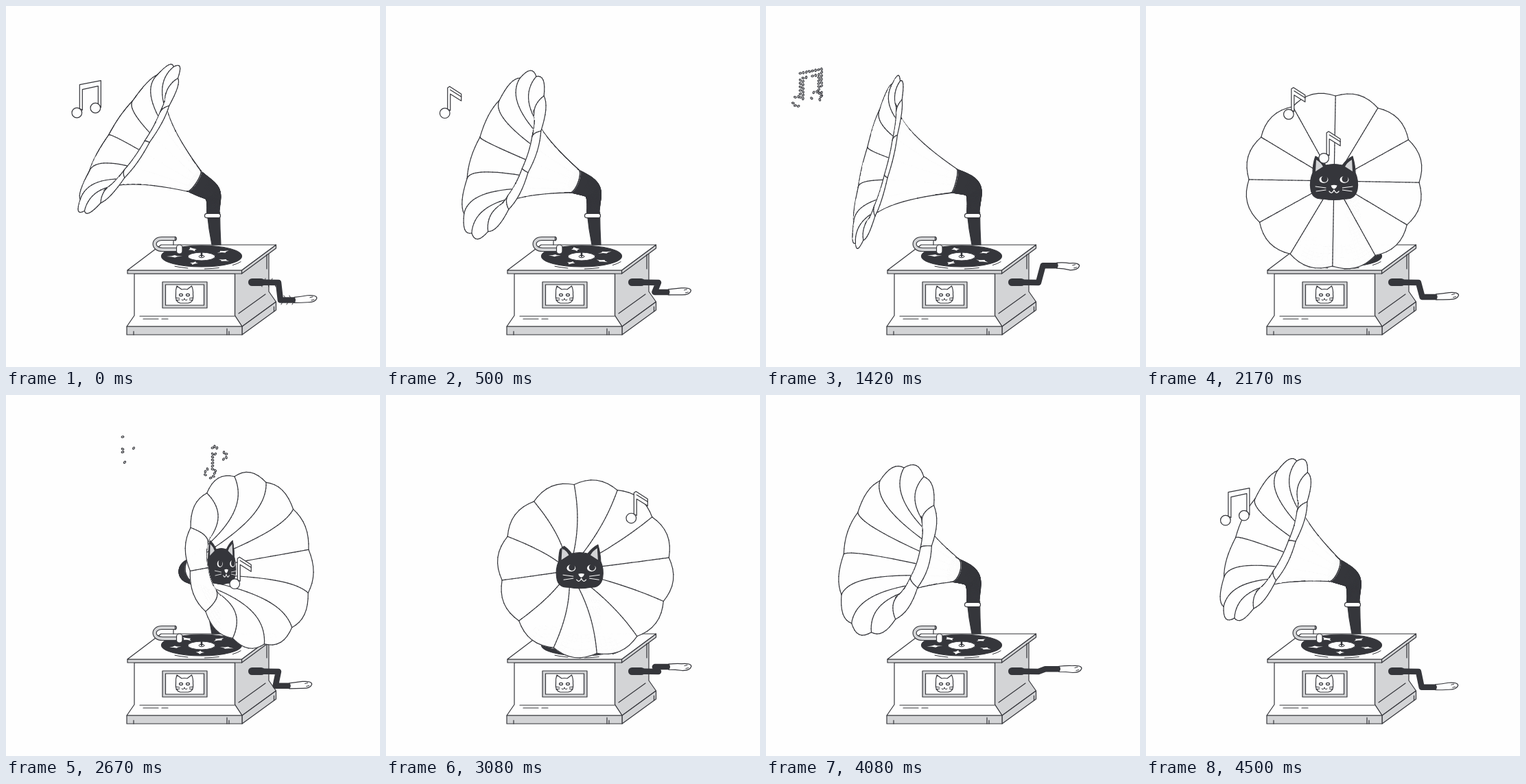
Recreate the animation shown at these times as an HTML page with a canvas. Size 545 by 526 pixels, loop 4580 ms.

```html
<!DOCTYPE html>
<html>
<head>
<meta charset="utf-8">
<style>
html, body { margin: 0; width: 100%; height: 100%; overflow: hidden; background: #fefefe; }
canvas { display: block; width: 545px; height: 526px; }
</style>
</head>
<body>
<canvas id="stage"></canvas>
<script>
const W = 545, H = 526, LOOP = 4580, STEPS = 55, TAU = Math.PI * 2, RAD = Math.PI / 180;
const INK = '#35363b', GREY = '#d3d4d6', PAPER = '#fefefe', LINE = 1.2;
const { sin, cos, abs, hypot } = Math;
const canvas = document.getElementById('stage'), ctx = canvas.getContext('2d');
const dpr = window.devicePixelRatio || 1;
canvas.width = W * dpr;
canvas.height = H * dpr;

const range = (n, f) => Array.from({ length: n }, (_, i) => f(i));
const smooth = u => u * u * (3 - 2 * u);
const hash = n => { const s = sin(n * 12.9898 + 4.1) * 43758.5453; return s - Math.floor(s); };

// Smooth cyclic motion through key poses; comes to rest at turning points.
function cycle(keys, t, field) {
  const n = keys.length;
  const key = i => {
    const k = keys[(i + n) % n];
    return { t: k.at + STEPS * Math.floor(i / n), v: k[field] };
  };
  const slope = i => (key(i + 1).v - key(i).v) / (key(i + 1).t - key(i).t);
  const tangent = i => {
    const a = slope(i - 1), b = slope(i);
    return a * b <= 0 ? 0 : 2 * a * b / (a + b);
  };
  let i = 0;
  while (key(i + 1).t <= t) i++;
  const a = key(i), b = key(i + 1), h = b.t - a.t, u = (t - a.t) / h, w = 1 - u;
  return a.v + (b.v - a.v) * smooth(u) + h * u * w * (tangent(i) * w - tangent(i + 1) * u);
}

function paint(fill, stroke = INK, width = LINE) {
  if (fill) { ctx.fillStyle = fill; ctx.fill(); }
  if (stroke) { ctx.strokeStyle = stroke; ctx.lineWidth = width; ctx.stroke(); }
}
function trace(pts) {
  ctx.beginPath();
  pts.forEach(([x, y]) => ctx.lineTo(x, y));
}
function poly(pts, fill, stroke, width) {
  trace(pts);
  ctx.closePath();
  paint(fill, stroke, width);
}
function line(pts, color = INK, width = LINE) {
  trace(pts);
  paint(null, color, width);
}
function oval(x, y, rx, ry, fill, stroke, width, turn = 0) {
  ctx.beginPath();
  ctx.ellipse(x, y, rx, ry, turn, 0, TAU);
  paint(fill, stroke, width);
}
function pill(x, y, w, h, r, fill) {
  ctx.beginPath();
  ctx.roundRect(x, y, w, h, r);
  paint(fill);
}
function shape(d, fill, stroke, width = LINE) {
  const p = new Path2D(d);
  if (fill) { ctx.fillStyle = fill; ctx.fill(p); }
  if (stroke) { ctx.strokeStyle = stroke; ctx.lineWidth = width; ctx.stroke(p); }
}
// Front and right faces of a flat slab receding by (dx, dy).
function slab(l, r, t, b, dx, dy) {
  poly([[r, t], [r + dx, t + dy], [r + dx, b + dy], [r, b]], GREY);
  poly([[l, t], [r, t], [r, b], [l, b]], GREY);
}

function drawBox() {
  poly([[333.5, 390], [383, 353], [383, 416], [393.5, 431], [344, 467], [333.5, 451]], GREY);
  poly([[187, 390], [333.5, 390], [333.5, 451], [344, 467], [176, 467], [187, 451]], PAPER);
  slab(176, 344, 467, 479, 49.5, -36);
  slab(177, 343.5, 385, 390, 50, -37);
  poly([[177, 385], [226, 348], [393.5, 348], [343.5, 385]], PAPER);
  shape('M195 452H333 M200 456H222 M227 456H236 M339 448L378 420 M380 362V383 M186 474V479 M322 470V479 M325 474V479 M390.5 438V445', null, INK);
  pill(228, 402, 65, 38, 0, GREY);
  pill(232.5, 406, 56, 30, 0, PAPER);
  shape('M249 408 L256 413 Q260 412 264 413 L270.5 408 Q273 413 272.5 420 Q274 432 265 433 L254 433 Q246 431 247.5 420 Q247 413 249 408Z', PAPER, INK);
  for (const s of [-1, 1]) {
    oval(260 + s * 5, 421, 2.5, 1.7, PAPER);
    line([[260 + s * 7, 426], [260 + s * 12.5, 425]], INK, 1);
    line([[260 + s * 7, 428], [260 + s * 12, 429]], INK, 1);
  }
  shape('M256 428 Q259 430 260 426 Q261 430 264 428', INK, INK, 1);
}

function drawRecord(i) {
  const cx = 285, cy = 364.5, spin = i * TAU * 2 / STEPS;
  oval(cx, cy, 58.5, 15.5, INK);
  for (let n = 0; n < 5; n++) {
    const star = range(8, k => {
      const a = spin + .6 + n * TAU / 5 + .16 * cos(k * TAU / 8) * (k % 2 ? .5 : 1);
      const r = .68 + .2 * sin(k * TAU / 8) * (k % 2 ? .5 : 1) * (.6 + .5 * hash(n));
      return [cx + 58 * r * cos(a), cy + 15.5 * r * sin(a)];
    });
    poly(star, PAPER, null);
  }
  oval(cx, cy + .5, 20, 6, PAPER, INK, 1);
  oval(cx, cy + .5, 4, 1.8, PAPER, INK, 1);
  line([[cx, cy - 5], [cx, cy]], INK, 2.6);
  for (let n = 0; n < 3; n++) {
    ctx.beginPath();
    ctx.ellipse(cx, cy + 1.5, 62, 17, 0, .4 + n * .75, .75 + n * .75);
    paint(null, INK, 1);
  }
}

function drawArm() {
  const d = 'M246 339 L227 339 C213 339 213 355 228 355 L250 355';
  shape('M244 340 V348', null, INK);
  shape(d, null, INK, 6.2);
  shape(d, null, GREY, 3.9);
  line([[246.5, 336], [246.5, 342]]);
  pill(248.5, 348, 8.5, 13, 4, PAPER);
}

function drawCrank(i) {
  const turn = i * TAU * 2 / STEPS, x = 399 - 8 * cos(turn - 1.69);
  const lift = cos(turn - .34), y = 403 + 27 * lift, tilt = -1.8 * lift;
  line([[358.5, 402.5], [372, 402.5]], INK, 11);
  line([[360, 402.5], [397, 403], [x, y], [x + 22, y]], INK, 8.5);
  if (abs(lift) > .93) {
    for (let n = 0; n < 5; n++) {
      const side = n % 2 ? -1 : 1;
      line([[372 + n * 5, 403 + side * 3], [373 + n * 5, 403 + side * 6]], INK, 1);
      line([[x + 3 + n * 4, y + side * 3], [x + 1 + n * 4, y + side * 6.5]], INK, 1);
    }
  }
  ctx.save();
  ctx.translate(x, y);
  shape(`M20 -4 Q30 -5 39 ${-5 + tilt} Q53 ${-6 + tilt} 53 ${-1 + tilt} Q51 ${5 + tilt} 40 ${5 + tilt} Q30 4 20 4 Q23 0 20 -4Z`, PAPER, INK);
  shape(`M43 ${-2 + tilt} l4 -1 M45 ${2 + tilt} l4 -1`, null, INK, 1);
  ctx.restore();
}

// Horn: a trumpet surface with twelve petals, turned about its neck.
// Yaw swings it left and right, lift raises the side it faces.
const NECK = [274, 255], PETALS = 12, ARC = PETALS * 8, RINGS = 22, RIM = 124;
const POSES = [
  { at: 0, yaw: -77, lift: 33 }, { at: 11, yaw: -65, lift: 11 }, { at: 17, yaw: -81, lift: 14 },
  { at: 26, yaw: 0, lift: 11 }, { at: 32, yaw: 45, lift: 10 }, { at: 43, yaw: -49, lift: 12.6 },
  { at: 54, yaw: -70.5, lift: 24 }
];
const flare = r => 118.5 * (1 - abs((109 - r) / 91) ** 2.1);

function hornFrame(i) {
  const yaw = cycle(POSES, i, 'yaw') * RAD, p = (i - 3) * TAU / STEPS;
  const tilt = -cycle(POSES, i, 'lift') * RAD * Math.tanh(yaw * 4);
  const roll = (9 * sin(p) + 4 * sin(2 * p)) * RAD;
  const place = (r, a, z) => {
    const x = r * cos(a + roll), y = r * sin(a + roll);
    const u = x * cos(yaw) + z * sin(yaw);
    return [NECK[0] + u * cos(tilt) - y * sin(tilt), NECK[1] + u * sin(tilt) + y * cos(tilt),
      z * cos(yaw) - x * sin(yaw)];
  };
  return { place, yaw, ax: sin(yaw) * cos(tilt), ay: sin(yaw) * sin(tilt) };
}

function drawNeck({ ax, ay }) {
  const p = [[301.5, 304], [304, 265], [NECK[0] - 36 * ax, NECK[1] - 36 * ay], NECK];
  poly([[293, 300], [311.5, 300], [312, 325], [313, 348], [300, 348], [296, 325]], INK);
  for (let n = 0; n <= 60; n++) {
    const u = n / 60, v = 1 - u, r = 9.5 + 8.5 * u ** 1.4;
    const at = c => v ** 3 * p[0][c] + 3 * v * v * u * p[1][c] + 3 * v * u * u * p[2][c] + u ** 3 * p[3][c];
    oval(at(0), at(1), r, r, INK, null);
  }
  pill(289.5, 302.3, 23, 6.4, 3.2, PAPER);
}

function drawHead({ ax, ay, yaw }) {
  ctx.save();
  ctx.translate(NECK[0] + 57 * ax, NECK[1] + 57 * ay + 2);
  ctx.scale(cos(yaw) ** 1.4, 1);
  shape('M-27 -38 Q-18 -34 -12 -25 Q0 -28 12 -25 Q19 -34 27 -38 Q31 -24 31 -14 Q36 -3 34 10 Q31 25 16 24 Q0 27 -16 24 Q-32 25 -34 10 Q-36 -3 -31 -14 Q-31 -27 -27 -38Z', INK, INK);
  shape('M-26 -33 Q-19 -29 -16 -23 L-27 -16Z M26 -33 Q19 -29 16 -23 L27 -16Z', GREY);
  ctx.translate(ax * 17, 0);
  for (const s of [-1, 1]) {
    oval(s * 15, -4, 6.5, 5, PAPER, null);
    oval(s * 15 + 1, -5, 4.6, 4.8, INK, null);
    line([[s * 12, 8], [s * 27, 6]], PAPER, 1);
    line([[s * 12, 11], [s * 26, 13]], PAPER, 1);
  }
  shape('M-4.5 4.5 Q0 3 4.5 4.5 Q3 9 0 9.5 Q-3 9 -4.5 4.5Z', PAPER);
  shape('M-7 13 Q-3 18 0 11 Q3 18 7 13', null, PAPER, 1.3);
  ctx.restore();
}

// Painter's algorithm: white facets, with ink on seams, rims and silhouettes.
function drawHorn(frame) {
  const items = [], wrap = j => (j + ARC) % ARC;
  const grid = range(RINGS + 1, i => {
    const r = 18 + (RIM - 18) * i / RINGS;
    return range(ARC, j => {
      const a = j * TAU / ARC, bulge = .05 * abs(sin(a * PETALS / 2)) * (r / RIM) ** 4;
      return frame.place(r * (1 + bulge), a, flare(r));
    });
  });
  const facing = range(RINGS, i => range(ARC, j => {
    const a = grid[i][j], b = grid[i][wrap(j + 1)], c = grid[i + 1][j], d = grid[i + 1][wrap(j + 1)];
    items.push({
      depth: (a[2] + b[2] + c[2] + d[2]) / 4,
      draw: () => poly([a, c, d, b], PAPER, PAPER, 1)
    });
    return (d[0] - a[0]) * (b[1] - c[1]) - (d[1] - a[1]) * (b[0] - c[0]) > 0;
  }));
  const edge = (a, b) => items.push({ depth: (a[2] + b[2]) / 2 + 14, draw: () => line([a, b]) });
  for (let i = 0; i <= RINGS; i++) {
    for (let j = 0; j < ARC; j++) {
      if (i === 0 || i === RINGS || facing[i][j] !== facing[i - 1][j]) edge(grid[i][j], grid[i][wrap(j + 1)]);
      if (i === RINGS) continue;
      const here = facing[i][j], seam = j % (ARC / PETALS) === 0;
      if (here !== facing[i][wrap(j - 1)] || (seam && here)) edge(grid[i][j], grid[i + 1][j]);
    }
  }
  const front = cos(frame.yaw);
  if (front > .5) items.push({ depth: 58 * front + 4, draw: () => drawHead(frame) });
  items.sort((p, q) => p.depth - q.depth).forEach(o => o.draw());
}

const PAIR = {
  body: [[4, -6], [4, -41], [35, -47], [35, -8], [31, -13], [31, -39], [8, -34], [8, -4]],
  heads: [[0, 0], [27, -7]]
};
const SINGLE = {
  body: [[4, -6], [4, -37], [7, -39], [24, -28], [24, -18], [8, -28], [8, -4]],
  heads: [[0, 0]], tail: [[8, -34], [24, -24]]
};
// Each note drifts from the horn during steps start to stop, then crumbles.
const MELT = 4;
const NOTES = [
  { kind: PAIR, start: 52, stop: 57.5, from: [130, 213], to: [83, 112] },
  { kind: SINGLE, start: 2, stop: 9, from: [130, 215], to: [57, 118] },
  { kind: PAIR, start: 8, stop: 17, from: [128, 224], to: [46, 139] },
  { kind: SINGLE, start: 22, stop: 29.5, from: [259, 231], to: [166, 98] },
  { kind: SINGLE, start: 23, stop: 31.5, from: [244, 265], to: [297, 114] },
  { kind: SINGLE, start: 29, stop: 41.5, from: [327, 300], to: [370, 129] }
];

function outline({ body, heads }) {
  const sides = body.flatMap(([x, y], n) => {
    const [p, q] = body[(n + 1) % body.length], count = Math.ceil(hypot(p - x, q - y) / 5);
    return range(count, s => [x + (p - x) * s / count, y + (q - y) * s / count]);
  });
  const rings = heads.flatMap(([x, y]) =>
    range(9, s => [x + 7 * cos(s * TAU / 9), y + 7 * sin(s * TAU / 9)]));
  return [...sides, ...rings];
}

function drawNote({ kind, start, stop, from, to }, t) {
  const gone = (t - stop + 1) / MELT;
  if (t < start || gone >= 1) return;
  const u = smooth(Math.min(1, (t - start) / (stop - start)));
  const grow = Math.min(1, .4 + (t - start) * .3);
  ctx.save();
  ctx.translate(from[0] + (to[0] - from[0]) * u, from[1] + (to[1] - from[1]) * u);
  ctx.scale(grow, grow);
  if (gone <= 0) {
    poly(kind.body, PAPER);
    if (kind.tail) line(kind.tail);
    kind.heads.forEach(([x, y]) => oval(x, y, 7.3, 7.3, PAPER));
  } else {
    outline(kind).forEach(([x, y], n) => {
      if (hash(n) > gone * .9) oval(x, y, 1.9, 1.2, GREY, INK, 1.1, hash(n + 50) * 3);
    });
  }
  ctx.restore();
}

function render(i) {
  ctx.setTransform(dpr, 0, 0, dpr, 0, 0);
  ctx.fillStyle = PAPER;
  ctx.fillRect(0, 0, W, H);
  ctx.lineJoin = ctx.lineCap = 'round';
  const frame = hornFrame(i);
  drawBox();
  drawRecord(i);
  drawArm();
  drawCrank(i);
  drawNeck(frame);
  drawHorn(frame);
  NOTES.forEach(n => { drawNote(n, i); drawNote(n, i + STEPS); });
}

let shown = -1;
function tick() {
  const i = Math.floor((performance.now() % LOOP) / LOOP * STEPS + .05) % STEPS;
  if (i !== shown) render(shown = i);
  requestAnimationFrame(tick);
}
tick();
</script>
</body>
</html>
```
